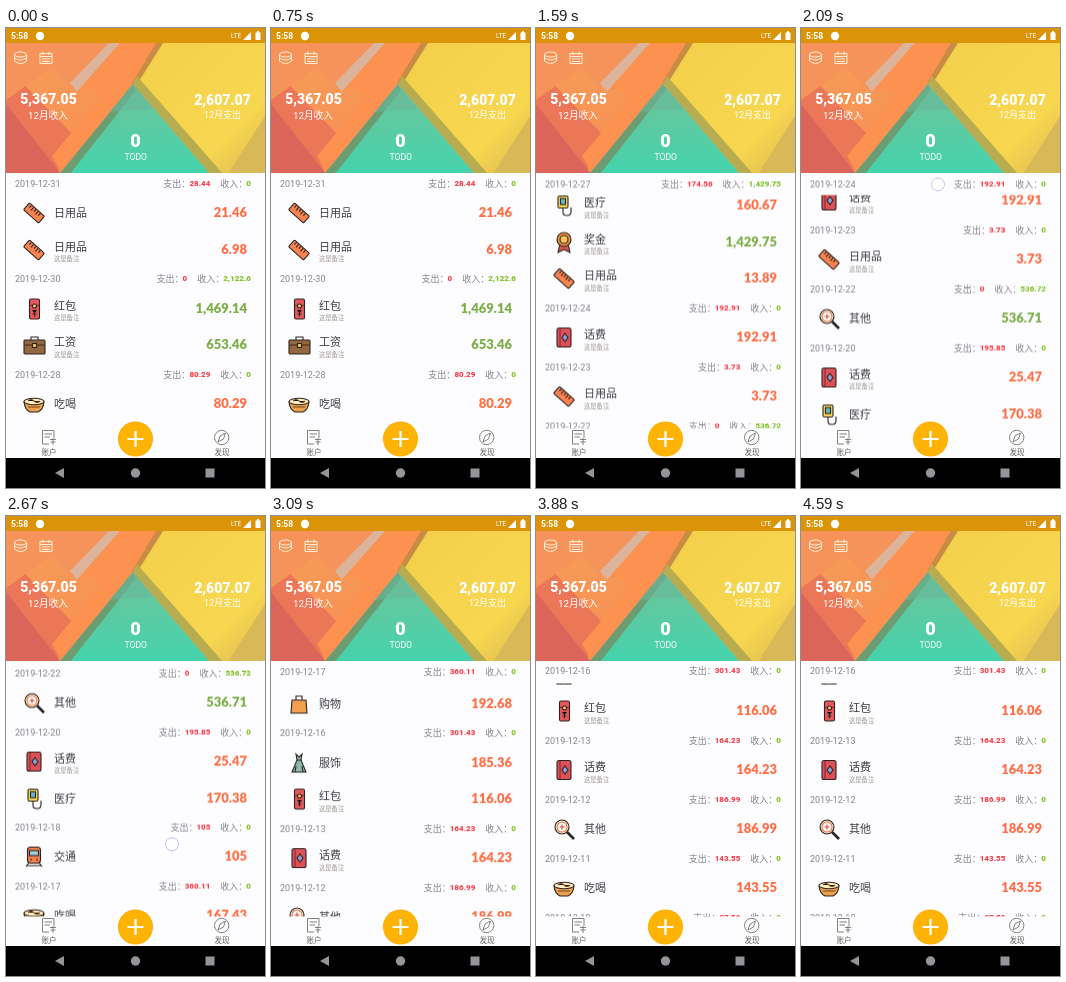
These frames come from a looping animation (259 px wide and 460 px high, 4.64 s). An HTML page:

```html
<!DOCTYPE html>
<html lang="zh-CN">
<head>
<meta charset="utf-8">
<style>
html, body { margin: 0; width: 100%; height: 100%; overflow: hidden; background: #fdfcfe; }
body { font-family: Roboto, "Noto Sans CJK SC", "Noto Sans CJK", sans-serif; }
#stage { position: relative; width: 259px; height: 460px; overflow: hidden; }
#art, #bars { position: absolute; left: 0; top: 0; }
#list { position: absolute; left: 0; top: 145px; width: 259px; height: 256px; overflow: hidden; background: #fdfcfe; }
#track { will-change: transform; }
.day { position: relative; }
.head { position: relative; z-index: 1; height: 22.3px; line-height: 22.3px; background: #fdfcfe;
  font-size: 9px; color: #85828c; white-space: nowrap; }
.head > * { position: absolute; top: 0; }
.date { left: 9px; }
.sums { right: 14px; display: flex; }
.sums b { font-weight: 900; font-size: 8px; margin-left: -1px; }
.sums .out { color: #f9404c; margin-right: 10px; }
.sums .in { color: #7fc327; }
.row { position: relative; height: 36.6px; }
.row > * { position: absolute; line-height: 16px; white-space: nowrap; }
.row svg { left: 17px; top: 7px; }
.name { left: 48px; top: 11px; font-size: 11px; color: #3d3b42; }
.noted .name { top: 8px; }
.note { left: 48px; top: 19.5px; font-size: 6.3px; color: #99958e; }
.sum { right: 18px; top: 9px; font: 900 13px/16px Lato, "Open Sans", sans-serif; color: #ff6e45; }
.sum.in { color: #7bae45; }
#touch { position: absolute; left: -7px; top: -7px; width: 12px; height: 12px; border: 1px solid #c9c0f3;
  border-radius: 50%; background: rgba(255, 255, 255, .72); }
text { fill: #fff; }
</style>
</head>
<body>
<div id="stage">
  <svg id="art" width="259" height="146" viewBox="0 0 259 146">
    <defs>
      <linearGradient id="warm" x1="0" y1="0" x2="1" y2="1">
        <stop offset="0" stop-color="#f5a05a"/><stop offset="1" stop-color="#fb8550"/>
      </linearGradient>
      <linearGradient id="mint" x1="0" y1="0" x2="0" y2="1">
        <stop offset="0" stop-color="#6fc39a"/><stop offset="1" stop-color="#45d3ac"/>
      </linearGradient>
      <linearGradient id="sun" x1="0" y1="0" x2="1" y2="1">
        <stop offset="0" stop-color="#f3cf4a"/><stop offset=".7" stop-color="#f8d750"/><stop offset="1" stop-color="#dcb852"/>
      </linearGradient>
    </defs>
    <rect width="259" height="146" fill="url(#warm)"/>
    <path d="M0 38L66 106L50 146H0Z" fill="#ec7658"/>
    <path d="M0 76L55 146H0Z" fill="#dc655a"/>
    <path d="M0 15H112L66 60L45 40L0 72Z" fill="#f6935a"/>
    <path d="M64 55L103 15H114L71 64Z" fill="#dcb49c"/>
    <path d="M71 64L114 15H152L128 55L54 142L46 128L96 68L82 60Z" fill="#fc9150"/>
    <path d="M152 15H259V146H204L127 56Z" fill="url(#sun)"/>
    <path d="M150 15H157L130 58L126 55Z" fill="#c98c46"/>
    <path d="M127 56L204 146H217L131 48Z" fill="#b7ad50"/>
    <path d="M259 88V146H222Z" fill="#d9b857"/>
    <path d="M127 56L204 146H54Z" fill="url(#mint)"/>
    <path d="M127 56L60 138L53 146H64L130 62Z" fill="#6b9c72"/>
    <path d="M127 56L104 84L148 81Z" fill="#68b99c" opacity=".6"/>
    <rect width="259" height="15" fill="#db9407"/>
    <g fill="#fff">
      <text x="5" y="11" font-size="8.6" font-weight="700">5:58</text>
      <circle cx="34" cy="8" r="4.2"/>
      <text x="225" y="10" font-size="6.5">LTE</text>
      <path d="M237 12L245 4V12ZM249.500 4.500H251V3H253V4.500H254.500V12H249.500Z"/>
    </g>
    <g fill="none" stroke="#fff2d8" stroke-width="1">
      <ellipse cx="14.500" cy="26.500" rx="6" ry="2.500"/>
      <path d="M8.500 26.500V33Q14.500 38 20.500 33V26.500M8.500 30Q14.500 34 20.500 30"/>
      <path d="M34 25.500H46V35.500H34ZM34 28.500H46M37 23.500V27M43 23.500V27M36 31H44M36 33.500H44"/>
    </g>
    <g text-anchor="middle">
      <text x="42.500" y="76" font-size="14" font-weight="800">5,367.05</text>
      <text x="42" y="90.500" font-size="9.700">12月收入</text>
      <text x="216.500" y="76.500" font-size="14" font-weight="800">2,607.07</text>
      <text x="216.500" y="90" font-size="9">12月支出</text>
      <text x="129.500" y="119" font-size="18" font-weight="900">0</text>
      <text x="129.700" y="132" font-size="8.600">TODO</text>
    </g>
  </svg>
  <div id="list"><div id="track"></div></div>
  <svg id="bars" width="259" height="460" viewBox="0 0 259 460">
    <rect y="400.500" width="259" height="30" fill="#fdfcfe"/>
    <rect y="430" width="259" height="30" fill="#000"/>
    <circle cx="129.500" cy="411" r="17.600" fill="#ffb305"/>
    <path d="M121.500 411H137.500M129.500 403V419" stroke="#fff" stroke-width="2.200"/>
    <g fill="none" stroke="#77736f" stroke-width=".9">
      <path d="M43 416H36.500V402.500H48V410M38.500 406H46M38.500 409H44M44 411.500H50M47 410V417M44.500 414H49.500"/>
      <circle cx="215.700" cy="409.500" r="7.200"/>
      <path d="M219.500 405L217.500 411L212 414L214 408Z"/>
    </g>
    <g text-anchor="middle" font-size="7.500">
      <text x="43" y="426.500" style="fill:#66625f">账户</text>
      <text x="216" y="426.500" style="fill:#66625f">发现</text>
    </g>
    <g fill="#96949a">
      <path d="M49 445L58 440V450Z"/><circle cx="129.500" cy="445" r="4.700"/><rect x="199.500" y="440.500" width="9" height="9"/>
    </g>
  </svg>
  <div id="touch"></div>
</div>
<script>
const LOOP = 4640, HEAD = 22.3, ROW = 36.6;

const icons = {
  日用品: '<g transform="rotate(42 11 11)"><rect x="1" y="6.500" width="20" height="9" rx="1" fill="#f8834f"/><path d="M4 7v3M7 7v4M10 7v3M13 7v4M16 7v3"/></g>',
  红包: '<rect x="6.500" y="1" width="10" height="20" rx="1.500" fill="#e5575c"/><path d="M7 7.500h9" stroke="#8e2630"/><circle cx="11.500" cy="8" r="2" fill="#f9cf63"/><path d="M9.500 12l2 2.500 2-2.500M11.500 14.500v4M9.500 16h4"/>',
  工资: '<path d="M8 6V3h7v3" fill="none"/><rect x="1" y="6" width="21" height="14" rx="1" fill="#94673f"/><path d="M1 11h21" stroke="#4b2e1d"/><rect x="9.500" y="9.500" width="4" height="4" fill="#f2c25b"/>',
  吃喝: '<path d="M1 9h20q-1 8-6 10H7Q2 17 1 9z" fill="#e9a04f"/><ellipse cx="11" cy="8.500" rx="10" ry="3.200" fill="#fff0bd"/><path d="M5 8q3-3 6 0t6 0M5 14h12" stroke="#7a4520"/>',
  医疗: '<rect x="5" y="1.500" width="10" height="12" rx="1.500" fill="#f9d556"/><rect x="7.500" y="4" width="5" height="6" fill="#65b8c4"/><path d="M10 14v4q0 3 4 3t4-4v-4" fill="none"/>',
  奖金: '<path d="M7 12L5 21l6-3 6 3-2-9z" fill="#d95747"/><circle cx="11" cy="8" r="7" fill="#f0953e"/><circle cx="11" cy="8" r="4" fill="#fbc75c"/>',
  话费: '<rect x="4" y="1.500" width="14" height="19" rx="2" fill="#dd5058"/><path d="M7 2v18" stroke="#8e2630"/><path d="M12 7l3 4-3 4-3-4z" fill="#87a6df"/>',
  其他: '<path d="M14 14l7 7" stroke-width="2.600"/><circle cx="9" cy="9" r="7" fill="#fae9cf"/><circle cx="9" cy="9" r="5" fill="#fffaf2" stroke="#e7774a"/><path d="M9 6.500v5M6.500 9h5" stroke="#d94848"/>',
  交通: '<path d="M6 17l-3 4M16 17l3 4M4 20h14"/><rect x="4.500" y="1.500" width="13" height="16" rx="3" fill="#f37f4b"/><rect x="6.500" y="5" width="9" height="5" fill="#9fd0dc"/><path d="M7 14h2M13 14h2"/>',
  服饰: '<path d="M8 2l1 6-5 12h14L13 8l1-6-3 3z" fill="#8eb9ad"/><path d="M9 8h4M8 14l-1 6M14 14l1 6"/>',
  购物: '<path d="M8 8V3h6v5" fill="none"/><path d="M4 7h14l1 13H3z" fill="#f3a04f"/>'
};

// date, spent, earned, then rows: name amount [+ income] [* noted]
const days = [
  ['31', '28.44', '0', '日用品 21.46', '日用品 6.98 *'],
  ['30', '0', '2,122.6', '红包 1,469.14 +*', '工资 653.46 +*'],
  ['28', '80.29', '0', '吃喝 80.29'],
  ['27', '174.56', '1,429.75', '医疗 160.67 *', '奖金 1,429.75 +*', '日用品 13.89 *'],
  ['24', '192.91', '0', '话费 192.91 *'],
  ['23', '3.73', '0', '日用品 3.73 *'],
  ['22', '0', '536.72', '其他 536.71 +'],
  ['20', '195.85', '0', '话费 25.47 *', '医疗 170.38'],
  ['18', '105', '0', '交通 105'],
  ['17', '360.11', '0', '吃喝 167.43', '购物 192.68'],
  ['16', '301.43', '0', '服饰 185.36', '红包 116.06 *'],
  ['13', '164.23', '0', '话费 164.23 *'],
  ['12', '186.99', '0', '其他 186.99'],
  ['11', '143.55', '0', '吃喝 143.55'],
  ['10', '97.50', '0', '交通 97.50']
];

function rowHtml(spec) {
  const [name, sum, flags = ''] = spec.split(' ');
  const noted = flags.includes('*');
  return `<div class="row ${noted ? 'noted' : ''}">
    <svg width="23" height="23" viewBox="0 0 23 23" stroke="#2c2523" stroke-width="1.1">${icons[name]}</svg>
    <span class="name">${name}</span>${noted ? '<span class="note">这是备注</span>' : ''}
    <span class="sum ${flags.includes('+') ? 'in' : ''}">${sum}</span></div>`;
}

const track = document.getElementById('track');
track.innerHTML = days.map(([d, spent, earned, ...rows]) => `<div class="day"><div class="head">
  <span class="date">2019-12-${d}</span><span class="sums">支出：<b class="out">${spent}</b>收入：<b class="in">${earned}</b></span>
  </div>${rows.map(rowHtml).join('')}</div>`).join('');

const heads = [...track.querySelectorAll('.head')];
let y = 0;
const tops = days.map(d => {
  const top = y;
  y += HEAD + ROW * (d.length - 3);
  return top;
});

// each swipe: a drag that speeds up, then a decaying fling
const swipes = [
  { start: 880, lift: 1215, from: 0, drop: 128, to: 264, fling: 550, x: 137, y: 270 },
  { start: 1770, lift: 2095, from: 264, drop: 397.5, to: 497.7, fling: 560, x: 137, y: 287 },
  { start: 2655, lift: 2990, from: 497.7, drop: 673, to: 835, fling: 680, x: 166, y: 329 }
];
const decay = u => (1 - Math.exp(-4 * Math.min(u, 1))) / (1 - Math.exp(-4));

function scrollAt(t, s) {
  if (!s) return 0;
  if (t < s.lift) return s.from + (s.drop - s.from) * ((t - s.start) / (s.lift - s.start)) ** 1.8;
  return s.drop + (s.to - s.drop) * decay((t - s.lift) / s.fling);
}

const touch = document.getElementById('touch');

function draw(t) {
  const swipe = swipes.filter(s => t >= s.start).pop();
  const pos = scrollAt(t, swipe);
  track.style.transform = `translateY(${-pos}px)`;
  heads.forEach((head, i) => {
    const room = ROW * (days[i].length - 3);
    head.style.transform = `translateY(${Math.max(0, Math.min(pos - tops[i], room))}px)`;
  });
  const down = swipe && t < swipe.lift + 10;
  touch.style.visibility = down ? 'visible' : 'hidden';
  if (down) {
    const dy = Math.min(pos, swipe.drop) - swipe.from;
    touch.style.transform = `translate(${swipe.x}px, ${swipe.y - dy}px)`;
  }
}

const begin = performance.now();
function tick() {
  draw((performance.now() - begin) % LOOP);
  requestAnimationFrame(tick);
}
tick();
</script>
</body>
</html>
```
